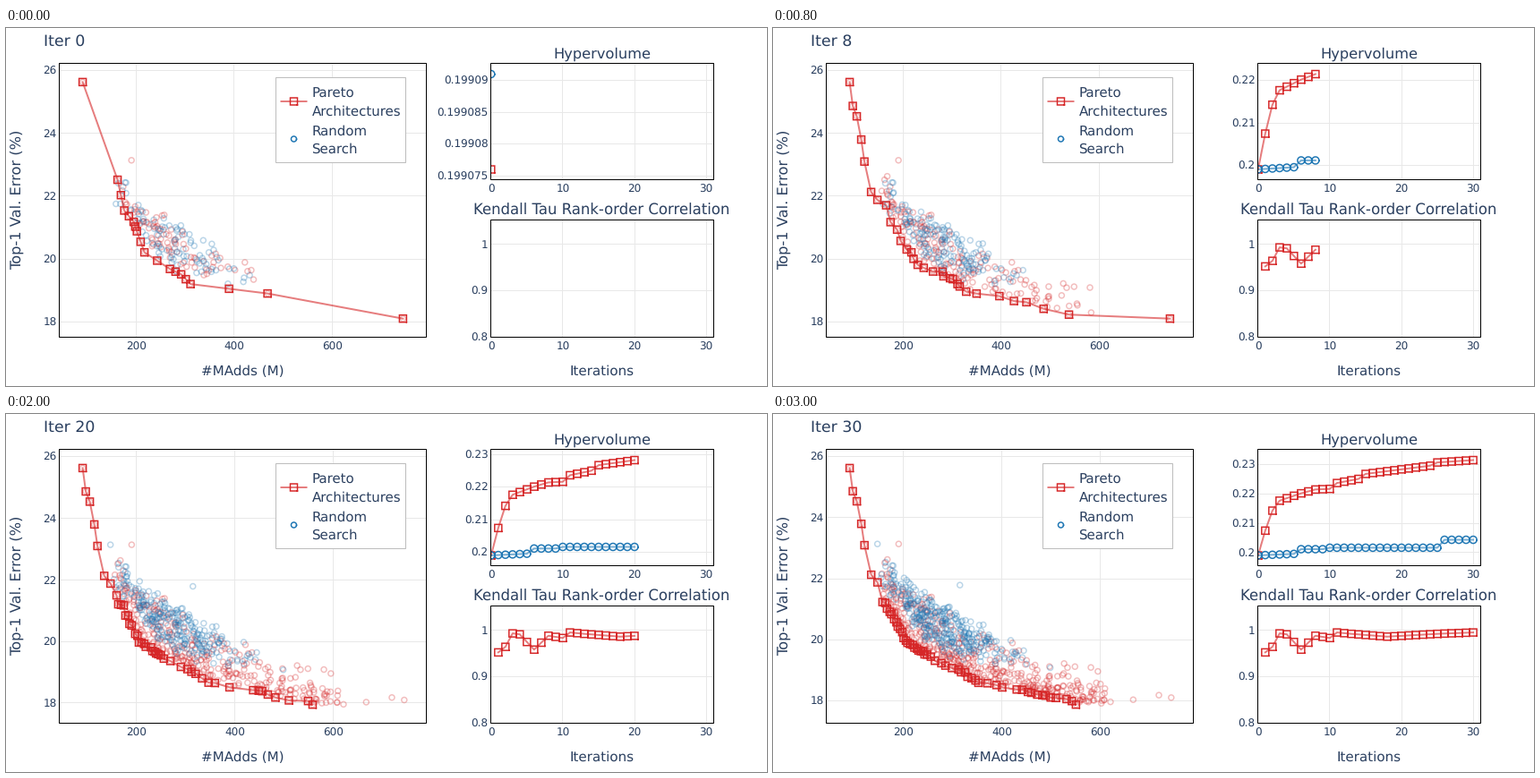
These frames come from a looping animation (850x400 px, 3.5 s). A matplotlib script:

```python
import math

import matplotlib.pyplot as plt
import numpy as np
from matplotlib.animation import FuncAnimation
from matplotlib.patches import Rectangle

W, H, DPI = 850, 400, 100
PT = 72 / DPI  # points per pixel
LAST, FRAMES, STEP_MS = 30, 35, 100

RED, BLUE, INK, GRID = "#d62728", "#1f77b4", "#2a3f5f", "#e8e8e8"
plt.rcParams["font.family"] = "DejaVu Sans"
plt.rcParams["text.hinting"] = "none"

# Panels as left, top, right, bottom in pixels
MAIN = (59.5, 39.5, 469.5, 345.5)
HYPER = (541.5, 39.5, 790.5, 169.5)
KENDALL = (541.5, 214.5, 790.5, 345.5)

# Key points (MAdds, error) of the first front and of the one approached
FIRST, WIDEST = (91.7, 25.63), (743, 18.1)
START = [(162.7, 22.52), (176.3, 21.54), (195.4, 21.18), (202, 20.88),
         (217.3, 20.21), (269.2, 19.68), (292, 19.51), (311, 19.2),
         (467.6, 18.9)]
SMALL = [(98.1, 24.87), (106.2, 24.54), (115.3, 23.8), (121.7, 23.1),
         (135.4, 22.13), (148.1, 21.88)]
GOAL = [(157, 21.2), (183, 20.6), (204, 19.91), (229, 19.66), (251, 19.37),
        (313, 18.95), (351, 18.56), (437, 18.3), (470, 18.17), (519, 17.94),
        (600, 17.93)]
# Lowest errors and isolated samples: iteration, MAdds, error
TIPS = [(0, *WIDEST), (11, 557.4, 17.95), (25, 550, 17.87)]
RED_FAR = [(0, 191, 23.14), (12, 620, 17.96), (13, 666, 18.03),
           (14, 718, 18.18)]
BLUE_FAR = [(11, 315, 21.79), (17, 148, 23.14), (19, 498, 19.08)]


def along(keys, u):
    """Points at fractional indices of a key polyline."""
    return np.array([np.interp(u, range(len(keys)), axis)
                     for axis in zip(*keys)]).T


def find_architectures(rng):
    found = [(0, *FIRST)] + TIPS
    found += [(0, x, y) for x, y in along(START, np.arange(0, 8.1, .5))]
    found += [(1 + k % 3, x, y) for k, (x, y) in enumerate(SMALL)]
    start_x, start_y = zip(FIRST, *START, WIDEST)
    for k in range(4 * LAST):
        it = 1 + k // 4
        x, goal = along(GOAL, (len(GOAL) - 1) * (k * .618034 % 1))
        lag = math.exp(-it / 8) * np.clip((x - 130) / 40, 0, 1)
        y = goal + lag * (np.interp(x, start_x, start_y) - goal)
        lowest = min(e for born, _, e in TIPS if born <= it)
        found.append((it, x, max(y + rng.exponential(.03), lowest + .03)))
    return found


def front_at(it):
    """Non-dominated points known at an iteration, left to right."""
    front, best = [], math.inf
    for x, y in sorted((x, y) for born, x, y in FOUND if born <= it):
        if y < best:
            front.append((x, y))
            best = y
    return np.array(front)


def stairs(front, x):
    return front[np.searchsorted(front[:, 0], x, side="right") - 1, 1]


def random_archs(rng, n, least):
    x = rng.triangular(least, 250, 455, n)
    low = np.interp(x, [140, 200, 250, 311, 450],
                    [22, 20.75, 19.8, 19.2, 19.1])
    spread = np.interp(x, [140, 200, 300, 400, 450], [.9, 1.5, 1.9, 1.1, .5])
    return x, low + spread * rng.beta(2, 2.1, n)


def make_clouds(rng):
    x, y = random_archs(rng, 80, 166)
    y = np.maximum(y, stairs(FRONTS[0], x) + rng.uniform(.04, .3, 80))
    red = [(0, a, b) for a, b in zip(x, y)]
    for it in range(1, LAST + 1):
        x = rng.uniform(160, min(612, 460 + 18 * it), 8)
        y = stairs(FRONTS[it], x) + .04 + np.minimum(rng.exponential(.22, 8), 1)
        red += [(it, a, b) for a, b in zip(x, y)]
    x, y = random_archs(rng, 90 + 8 * LAST, 135)
    births = np.maximum(0, (np.arange(len(x)) - 82) // 8)
    blue = list(zip(births, x, y))
    return np.array(red + RED_FAR + FOUND), np.array(blue + BLUE_FAR)


RNG = np.random.default_rng(12)
FOUND = find_architectures(RNG)
FRONTS = [front_at(it) for it in range(LAST + 1)]
RED_CLOUD, BLUE_CLOUD = make_clouds(RNG)

ITERS = np.arange(LAST + 1)
HV_RED = np.interp(
    ITERS, [0, 1, 2, 3, 6, 8, 10, 11, 14, 15, 24, 25, 30],
    [.199076, .2075, .2143, .2177, .2202, .2215, .2217, .2237, .2251, .2268,
     .2296, .2307, .2315])
HV_BLUE = (.199091 + .0001 * np.minimum(ITERS, 5) + .0016 * (ITERS >= 6)
           + .0005 * (ITERS >= 10) + .0027 * (ITERS >= 26))
TAU = np.interp(ITERS, [1, 2, 3, 4, 6, 8, 10, 11, 13, 18, 25, 30],
                [.952, .964, .993, .991, .958, .988, .983, .995, .992, .986,
                 .992, .995])

fig = plt.figure(figsize=(W / DPI, H / DPI), dpi=DPI, facecolor="white")
ax = fig.add_axes([0, 0, 1, 1])


def label(x, y, s, size, ha="center", **kw):
    ax.text(x, y, s, fontsize=size * PT, color=INK, ha=ha,
            va=kw.pop("va", "baseline"), zorder=9, **kw)


def line(xs, ys, color, width=1, **kw):
    return ax.plot(xs, ys, color=color, lw=width * PT, snap=False, **kw)[0]


def marks(xs, ys, color, sides, size, **kw):
    """Open polygons around points, kept at exact sub-pixel places."""
    a = np.linspace(0, 2 * math.pi, sides + 1) + math.pi / sides
    r = size / 2 / math.cos(math.pi / sides)
    dx, dy = (np.append(r * f(a), np.nan) for f in (np.cos, np.sin))
    return line(np.add.outer(xs, dx).ravel(), np.add.outer(ys, dy).ravel(),
                color, 1.5, solid_capstyle="projecting",
                solid_joinstyle="miter", **kw)


SQUARE, CIRCLE = 4, 32


def center(v):
    return math.floor(v) + .5


def grid_x(panel, px, text):
    left, top, right, bottom = panel
    if left + 1 < px < right - 1:
        line([center(px)] * 2, [top, bottom], GRID, zorder=1)
    label(px, bottom + 14.8, text, 12)


def grid_y(panel, py, text):
    left, top, right, bottom = panel
    if top + 1 < py < bottom - 1:
        line([left, right], [center(py)] * 2, GRID, zorder=1)
    label(left - 3, py + 4.4, text, 12, "right")


def border(panel, **kw):
    left, top, right, bottom = panel
    style = dict(fc="none", ec="black", lw=PT, zorder=5, snap=False)
    return ax.add_patch(Rectangle((left, top), right - left, bottom - top,
                                  **{**style, **kw}))


def series(xs, ys, color, sides, clip):
    for art in (line(xs, ys, color, 2, alpha=.6, zorder=3),
                marks(xs, ys, color, sides, 8, zorder=4)):
        art.set_clip_path(clip)


def draw_main(it):
    front = FRONTS[it]
    x0, y0 = FIRST
    y_min = front[-1, 1]
    # Square markers need slightly more margin than circles
    right = 443.4 if front[-1, 0] == WIDEST[0] else 444.8

    def px(x):
        return 85.6 + (x - x0) * (right - 85.6) / (WIDEST[0] - x0)

    def py(y):
        return 60.4 + (y0 - y) * 264.3 / (y0 - y_min)

    for v in (200, 400, 600):
        grid_x(MAIN, px(v), str(v))
    for v in range(18, 27, 2):
        grid_y(MAIN, py(v), str(v))
    for cloud, color in ((RED_CLOUD, RED), (BLUE_CLOUD, BLUE)):
        seen = cloud[cloud[:, 0] <= it]
        ax.scatter(px(seen[:, 1]), py(seen[:, 2]), s=(6 * PT) ** 2,
                   facecolors="none", edgecolors=color, alpha=.3,
                   linewidths=1.5 * PT, zorder=2)
    series(px(front[:, 0]), py(front[:, 1]), RED, SQUARE, border(MAIN))
    label(264.5, 388, "#MAdds (M)", 15.1)
    label(12, 192, "Top-1 Val. Error (%)", 16.3, rotation=90, va="center")


def draw_legend():
    border((301.5, 55.5, 446.5, 150.5), fc="white", ec="#bdbdbd", zorder=6)
    line([306.5, 336.5], [82, 82], RED, 2, alpha=.6, zorder=7,
         solid_capstyle="butt")
    marks([321.5], [82], RED, SQUARE, 8, zorder=8)
    marks([321.5], [124], BLUE, CIRCLE, 6, zorder=8)
    for y, s in ((78, "Pareto"), (97.3, "Architectures"),
                 (120, "Random"), (139.3, "Search")):
        label(341.5, y, s, 15, "left")


def iter_px(i):
    return 541.8 + 8.01 * i


def draw_hyper(it):
    lo, hi = HV_RED[0], max(HV_RED[it], HV_BLUE[it])
    scale = (158 - 51.5) / (hi - lo)

    def py(v):
        return 51.5 + (hi - v) * scale

    top, bottom = HYPER[1], HYPER[3]
    rough = (bottom - top) / scale / 5
    mag = 10 ** math.floor(math.log10(rough))
    step = next(m * mag for m in (2, 5, 10) if m * mag >= rough)
    first = math.ceil((hi - (bottom - 51.5) / scale) / step)
    last = math.floor((hi + (51.5 - top) / scale) / step)
    for k in range(first, last + 1):
        grid_y(HYPER, py(k * step), f"{k * step:.6g}")
    clip = border(HYPER)
    xs = iter_px(ITERS[:it + 1])
    series(xs, py(HV_RED[:it + 1]), RED, SQUARE, clip)
    series(xs, py(HV_BLUE[:it + 1]), BLUE, CIRCLE, clip)
    label(665.5, 34, "Hypervolume", 16.2)


def draw_kendall(it):
    def py(v):
        return 241.5 + (1 - v) * 518

    for v in (.8, .9, 1):
        grid_y(KENDALL, py(v), f"{v:g}")
    series(iter_px(ITERS[1:it + 1]), py(TAU[1:it + 1]), RED, SQUARE,
           border(KENDALL))
    label(665.3, 209, "Kendall Tau Rank-order Correlation", 16.5)
    label(666, 388, "Iterations", 15.1)


def draw(frame):
    it = min(frame, LAST)
    ax.clear()
    ax.set(xlim=(0, W), ylim=(H, 0))
    ax.axis("off")
    label(42.5, 20, f"Iter {it}", 17.4, "left")
    for panel in (HYPER, KENDALL):
        for v in (0, 10, 20, 30):
            grid_x(panel, iter_px(v), str(v))
    draw_main(it)
    draw_legend()
    draw_hyper(it)
    draw_kendall(it)
    return []


anim = FuncAnimation(fig, draw, frames=FRAMES, interval=STEP_MS, repeat=True,
                     repeat_delay=0, blit=False)
plt.show()
```
